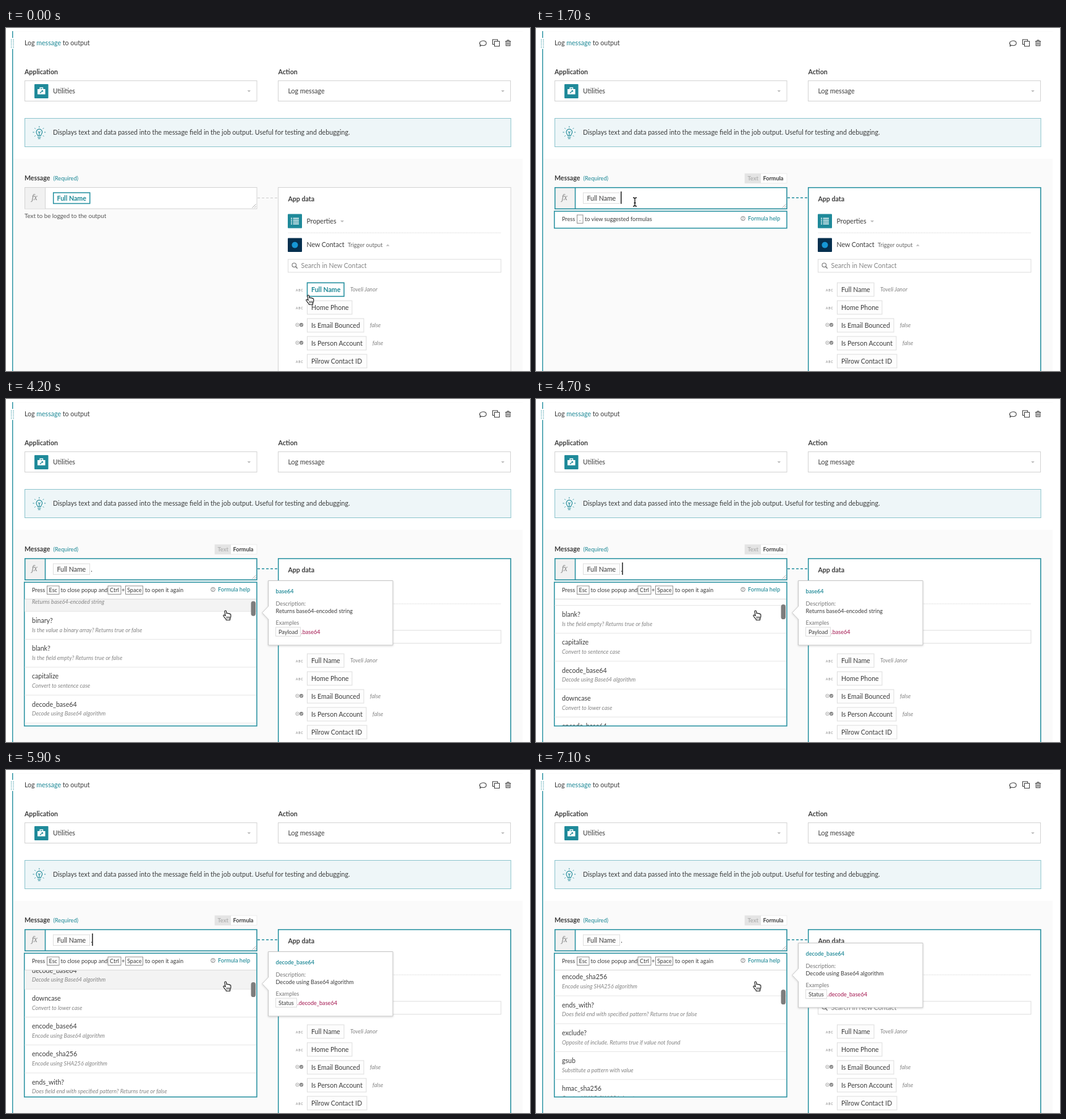
Write an HTML page that moves like this. It is 848x556 px and loops after 7.2 s.

```html
<!DOCTYPE html>
<html lang="en">
<head>
<meta charset="utf-8">
<title>Formula popup</title>
<style>
  html, body { margin: 0; width: 100%; height: 100%; overflow: hidden; background: #fff; }
  svg { display: block; width: 848px; height: 556px; }
  text { font: 10.6px Lato, "Open Sans", sans-serif; fill: #3d3d3d; white-space: pre; }
  .b { font-weight: 700; }
  .s { font-size: 9.1px; }
  .i { font-style: italic; fill: #858585; }
  .teal { fill: #1d8896; }
  .grey { fill: #858585; }
  .abc { font-size: 4.8px; font-weight: 700; letter-spacing: .9px; fill: #999; }
  .box { fill: #fff; stroke: #d3d3d3; }
  .pill { fill: #fdfdfd; stroke: #dedede; }
  .key { fill: #fff; stroke: #777; stroke-width: .8; }
  .ring { fill: none; stroke: #2590a0; stroke-width: 1.5; }
  .line { fill: none; stroke: #e6e6e6; }
  .icon { fill: none; stroke: #444; stroke-width: 1.1; stroke-linejoin: round; }
  .bulb { fill: none; stroke: #1d8896; stroke-width: 1.1; stroke-linecap: round; }
  .caretdown { fill: #bdbdbd; }
  .pointer { fill: #fff; stroke: #111; stroke-width: 1.1; stroke-linejoin: round; }
</style>
</head>
<body>
<svg viewBox="0 0 848 556">
  <defs>
    <clipPath id="listClip"><rect x="30" y="324.5" width="375" height="205"/></clipPath>
    <filter id="shadow" x="-10%" y="-10%" width="120%" height="125%">
      <feDropShadow dx="0" dy="1" stdDeviation="1.5" flood-opacity=".16"/>
    </filter>
  </defs>

  <!-- step card -->
  <rect width="848" height="556" fill="#fff"/>
  <path d="M12 5.5H836" stroke="#fafafa"/>
  <rect x="12" y="212" width="824" height="344" fill="#fafafa"/>
  <path d="M10.7 5V556" stroke="#2590a0" stroke-width="1.4"/>
  <rect x="7" y="16" width="7" height="18" fill="#fff"/>
  <path d="M8.6 18V33M12 18V33" stroke="#5aa9b4" stroke-width="1.3" stroke-dasharray="1.3 1.3"/>
  <text x="30" y="28">Log <tspan class="teal">message</tspan> to output</text>
  <path class="icon" d="M772 20.7c7 0 7 7.8 0 7.8c-.9 0-1.6-.1-2.3-.4l-2.7 1.4l.7-2.5c-2.7-2.4-.6-6.3 4.300-6.300z"/>
  <path class="icon" d="M790.500 21.500H798.500V29.500H790.500ZM790 26.500H787.500V18.800H795.500V21"/>
  <path class="icon" d="M808 21.500H817M811 21V19.700H814V21M809.200 22V28.800H815.800V22M811.400 23V27.500M813.600 23V27.500" stroke-width="1.5"/>

  <text class="b" x="30" y="75">Application</text>
  <text class="b" x="440.500" y="75">Action</text>
  <rect class="box" x="30.500" y="85.500" width="375.500" height="33"/>
  <rect class="box" x="440.500" y="85.500" width="376" height="33"/>
  <path class="caretdown" d="M390.500 101h5.500l-2.750 3zM801.200 101h5.500l-2.750 3z"/>
  <rect x="46" y="91" width="22.500" height="23" rx="1" fill="#1f8a9a"/>
  <path d="M51 99h12.500v8.500H51z" fill="#fff"/>
  <path d="M55 99v-2h4.500v2" fill="none" stroke="#fff" stroke-width="1.3"/>
  <path d="M55 105.500l3.800-3.600M57.500 101.500h2v2" fill="none" stroke="#1f8a9a" stroke-width="1.2"/>
  <text x="76" y="106">Utilities</text>
  <text x="456.500" y="106">Log message</text>

  <rect x="30.500" y="146.500" width="786.500" height="46" fill="#eef6f8" stroke="#8cc4cd"/>
  <g class="bulb">
    <path d="M51.300 174.500c0-2-2.300-2.800-2.300-5.800a4.800 4.800 0 0 1 9.600 0c0 3-2.300 3.800-2.300 5.800zM51.500 177H56M52.300 179.300H55.200M53.800 174v-4.500l-1.500-1.300M53.800 169.500l1.500-1.300"/>
    <path d="M53.800 159.500v1.500M46.500 162.300l1 1M61 162.300l-1 1M43.800 169h1.500M62.300 169h1.500M46.500 175.500l1-1M61 175.500l-1-1" stroke-width=".9"/>
  </g>
  <text x="76" y="173">Displays text and data passed into the message field in the job output. Useful for testing and debugging.</text>

  <!-- message field -->
  <text class="b" x="30" y="247">Message</text>
  <text class="s teal" x="76.500" y="246.700">(Required)</text>
  <rect class="box" x="30.500" y="258.500" width="375.500" height="34.500"/>
  <rect x="31" y="259" width="32.500" height="33.500" fill="#f1f1f1"/>
  <path d="M63.500 259V293" stroke="#d3d3d3"/>
  <text x="41.500" y="279" style="font:italic 12px 'Noto Serif',serif;fill:#8a8a8a;letter-spacing:-.8px">fx</text>
  <path d="M398.500 291.500l6-6M402 291.500l2.500-2.500" stroke="#999" stroke-width=".8"/>
  <text x="30" y="307.500" style="font-size:9.7px;fill:#555">Text to be logged to the output</text>
  <path d="M407 275.500H440" stroke="#ccc" stroke-dasharray="4 3"/>

  <!-- data panel -->
  <rect class="box" x="440.500" y="258.500" width="376.500" height="310"/>
  <text class="b" x="456.500" y="281">App data</text>
  <rect x="456" y="301.500" width="23" height="23" rx="1" fill="#1f8a9a"/>
  <path d="M461 308.500h2M461 311.500h2M461 314.500h2M461 317.500h2M464.500 308.500H474M464.500 311.500H474M464.500 314.500H474M464.500 317.500H474" stroke="#fff" stroke-width="1.5"/>
  <text x="486.500" y="317.300">Properties</text>
  <path class="caretdown" d="M541 312h6l-3 3zM614.800 353.500h6l-3-3z"/>
  <path d="M456.500 332H801" stroke="#e2e2e2" stroke-dasharray="2 .6"/>
  <rect x="456" y="340.500" width="23" height="22.500" rx="1" fill="#06304f"/>
  <circle cx="467.500" cy="351.800" r="5" fill="#1697d6"/>
  <text x="486.500" y="355.300">New Contact</text>
  <text class="s" x="553" y="355" style="fill:#666">Trigger output</text>
  <rect class="box" x="456.500" y="375" width="344.500" height="21" style="stroke:#ddd"/>
  <circle cx="466.300" cy="384.300" r="3.300" class="icon" style="stroke:#777"/>
  <path d="M468.800 386.800l2.800 2.900" stroke="#777" stroke-width="1.500"/>
  <text class="grey" x="477.500" y="389.300">Search in New Contact</text>
  <g id="fields"></g>

  <g id="grab">
    <rect x="487.500" y="413" width="59.500" height="22" fill="#fff" class="ring" style="fill:#fff"/>
    <text class="b teal" x="494" y="427.500">Full Name</text>
    <rect x="76.700" y="267" width="59" height="17.500" class="ring" style="fill:#fff"/>
    <text class="b teal" x="82.500" y="279.700">Full Name</text>
  </g>
  <g id="plain">
    <rect class="pill" x="76.500" y="267" width="59" height="17.500"/>
    <text x="82.500" y="279.700">Full Name</text>
  </g>
  <text id="dot" x="137.300" y="279.700">.</text>

  <!-- focused look -->
  <g id="focus">
    <rect class="ring" x="30.700" y="258.700" width="375.200" height="34.500"/>
    <path class="ring" d="M63.500 259V293"/>
    <rect class="ring" x="440.700" y="258.700" width="376" height="310"/>
    <path class="ring" d="M407 275.300H440" stroke-dasharray="4 3"/>
    <rect x="338" y="236" width="68" height="15.500" fill="#fff" stroke="#e9e9e9" stroke-width=".8"/>
    <rect x="338" y="236" width="26" height="15.500" fill="#e4e4e4"/>
    <text class="s b" x="342.500" y="247" style="fill:#b3b3b3">Text</text>
    <text class="s b" x="367.500" y="247">Formula</text>
  </g>
  <rect id="caret" y="265" width="1.500" height="20" fill="#222"/>

  <!-- suggestion popup -->
  <g id="popup">
    <rect id="frame" class="ring" x="29.700" y="297" width="376.200" style="fill:#fff"/>
    <text class="s" x="42" y="312.500">Press</text>
    <g id="hint">
      <rect class="key" x="66.500" y="303" width="9.500" height="13.500"/>
      <text class="s" x="70" y="312.500">.</text>
      <text class="s" x="79" y="312.500">to view suggested formulas</text>
    </g>
    <g id="keys">
      <rect class="key" x="66.500" y="303" width="19.500" height="13.500"/>
      <rect class="key" x="165" y="303" width="21" height="13.500"/>
      <rect class="key" x="193.500" y="303" width="28" height="13.500"/>
      <text class="s" x="69.500" y="312.500">Esc</text>
      <text class="s" x="88.500" y="312.500">to close popup and</text>
      <text class="s" x="168" y="312.500">Ctrl</text>
      <text class="s" x="187" y="312.500">+</text>
      <text class="s" x="196" y="312.500">Space</text>
      <text class="s" x="225" y="312.500">to open it again</text>
    </g>
    <circle cx="335" cy="308.700" r="3.300" fill="none" stroke="#777" stroke-width=".9"/>
    <text x="333.500" y="310.900" style="font-size:6px;font-weight:700;fill:#777">?</text>
    <text class="s teal" x="343" y="312" style="font-weight:500">Formula help</text>
    <g id="list" clip-path="url(#listClip)">
      <g id="rows"></g>
      <rect id="thumb" x="396.500" width="7.500" height="24" rx="3.700" fill="#7d7d7d"/>
    </g>
    <path id="rule" class="line" d="M30.500 324.300H405" style="stroke:#d8d8d8"/>
  </g>

  <g id="tip">
    <path d="M424.500 294.500H626V399H424.500V357L414.500 346.500L424.500 336Z" fill="#fff" stroke="#c6c6c6" filter="url(#shadow)"/>
    <text id="tipName" class="s teal" x="436.500" y="314.500" style="font-weight:600"></text>
    <text class="s" x="436.500" y="334.500" style="fill:#777">Description:</text>
    <text id="tipAbout" class="s" x="436.500" y="346.700"></text>
    <text class="s" x="436.500" y="365.700" style="fill:#777">Examples</text>
    <rect id="tipPill" class="pill" x="436.500" y="370" width="40" height="14.500"/>
    <text id="tipArg" class="s" x="441" y="380.700"></text>
    <text id="tipCall" class="s" y="380.700" style="fill:#a3164f"></text>
  </g>

  <g id="cursor">
    <g id="hand">
      <path class="pointer" d="M-4.200-6.500c0-2 2.600-2 2.800 0l.4 3.200c.6-1 2.300-.8 2.500.3c.6-.8 2.100-.5 2.300.6c.8-.6 2-.1 2 1.100v2.700c0 2-1.300 2.600-1.300 4.600v1.200h-6.300v-1c-1-1.600-3.800-4-4.400-5.600c-.4-1.200 1-2 2-1.200l1.300 1.200z"/>
      <path d="M-.5 1.500v3.300M1.600 1.500v3.300M3.600 1.500v3.300" stroke="#111" stroke-width=".9"/>
    </g>
    <path id="arrow" d="M-3-8v13l3-2.800l1.900 4.400l2-.9l-1.900-4.300h4z" fill="#111" stroke="#fff" stroke-width="1"/>
    <path id="beam" d="M-3-6.500q2.500 0 3 1.500q.5-1.500 3-1.500M0-5.500V6.500M-3 7.500q2.500 0 3-1.500q.5 1.500 3 1.500M-1.500 2h3" fill="none" stroke="#111" stroke-width="1.300"/>
  </g>
</svg>

<script>
const LOOP = 7200, STEP = 100, PITCH = 45.25, BLINK = 533.3;
const $ = id => document.getElementById(id);

const fields = [
  ["Full Name", 59.5, "Toveli Janor"],
  ["Home Phone", 72.5],
  ["Is Email Bounced", 91.5, "false"],
  ["Is Person Account", 95.5, "false"],
  ["Pilrow Contact ID", 96.5]
];

const formulas = [
  ["base64", "Returns base64-encoded string"],
  ["binary?", "Is the value a binary array? Returns true or false"],
  ["blank?", "Is the field empty? Returns true or false"],
  ["capitalize", "Convert to sentence case"],
  ["decode_base64", "Decode using Base64 algorithm"],
  ["downcase", "Convert to lower case"],
  ["encode_base64", "Encode using Base64 algorithm"],
  ["encode_sha256", "Encode using SHA256 algorithm"],
  ["ends_with?", "Does field end with specified pattern? Returns true or false"],
  ["exclude?", "Opposite of include. Returns true if value not found"],
  ["gsub", "Substitute a pattern with value"],
  ["hmac_sha256", "Creates HMAC_SHA256 signature"]
];

const toggleIcon = y => `
  <circle cx="471.500" cy="${y}" r="2.700" fill="none" stroke="#999" stroke-width=".8"/>
  <path d="M470.500 ${y - 1}l2 2m0-2l-2 2" stroke="#999" stroke-width=".7"/>
  <circle cx="478" cy="${y}" r="3.100" fill="#888"/>
  <path d="M476.500 ${y}l1.200 1.200l2-2.200" fill="none" stroke="#fff" stroke-width=".9"/>`;

$("fields").innerHTML = fields.map(([name, w, sample], n) => {
  const y = 424 + n * 29;
  const mark = sample === "false" ? toggleIcon(y - .8) : `<text class="abc" x="469" y="${y + 2.7}">ABC</text>`;
  const note = sample ? `<text class="s i" x="${487.5 + w + 10}" y="${y + 3.2}">${sample}</text>` : "";
  return `${mark}<rect class="pill" x="487.500" y="${y - 11}" width="${w}" height="22"/>
    <text x="494" y="${y + 3.5}">${name}</text>${note}`;
}).join("");

$("rows").innerHTML = `<rect id="mark" x="30" width="375" height="${PITCH}" fill="#f3f3f3"/>` +
  formulas.map(([name, about], n) => {
    const y = 324 + n * PITCH;
    return `<text x="42" y="${y + 18.5}">${name}</text>
      <text class="s i" x="42" y="${y + 33.3}">${about}</text>
      <path class="line" d="M30 ${y + PITCH}H405"/>`;
  }).join("");

// [time, value, ...] points
const scrollPath = [[3900, 0], [4100, 14], [4700, 80], [5400, 172], [5700, 195], [5900, 195], [6600, 256], [7100, 320]];
const pointerPath = [[0, 492, 441], [1500, 160, 281.5], [2300, 160, 281.5], [3100, 320, 345], [3200, 320, 345], [3600, 358, 351]];

function along(path, t, ease = k => k) {
  const n = path.findIndex(p => p[0] > t);
  if (n === 0) return path[0].slice(1);
  if (n < 0) return path[path.length - 1].slice(1);
  const a = path[n - 1], b = path[n], k = ease((t - a[0]) / (b[0] - a[0]));
  return a.slice(1).map((v, i) => v + (b[i + 1] - v) * k);
}
const smooth = k => k * k * (3 - 2 * k);
const show = (id, on) => { $(id).style.display = on ? "" : "none"; };

function caretOn(t) {
  if (t < 1600) return false;
  const since = t < 2200 ? t - 1600 : t - 2200;
  return Math.floor(since / BLINK) % 2 === 0;
}

function drawTip(t) {
  const late = t >= 5900;
  const [name, about] = formulas[late ? 4 : 0];
  show("tip", t >= 2400);
  $("tip").setAttribute("transform", `translate(0 ${t >= 6000 ? -14 : 0})`);
  $("tipName").textContent = name;
  $("tipAbout").textContent = about;
  $("tipArg").textContent = late ? "Status" : "Payload";
  $("tipPill").setAttribute("width", late ? 34 : 40);
  $("tipCall").setAttribute("x", late ? 471.5 : 477.5);
  $("tipCall").textContent = "." + name;
  $("mark").setAttribute("y", 324 + (late ? 4 : 0) * PITCH);
}

function drawPointer(t) {
  const [x, y] = along(pointerPath, t, smooth);
  const inField = x > 64 && x < 406 && y > 258 && y < 296;
  const clickable = t < 200 || (t > 2300 && y > 331);
  $("cursor").setAttribute("transform", `translate(${x} ${y})`);
  show("beam", inField);
  show("hand", !inField && clickable);
  show("arrow", !inField && !clickable);
}

function draw(t) {
  const open = t >= 2300;
  show("grab", t < 200);
  show("plain", t >= 200);
  $("focus").style.opacity = Math.min(1, Math.max(0, (t - 1500) / 200));
  show("dot", t >= 2200);
  show("caret", caretOn(t));
  $("caret").setAttribute("x", t < 2200 ? 137 : 139.2);

  show("popup", t >= 1700);
  $("frame").setAttribute("height", open ? 233 : 27.5);
  show("hint", !open);
  for (const id of ["keys", "list", "rule"]) show(id, open);

  const [scroll] = along(scrollPath, t);
  $("rows").setAttribute("transform", `translate(0 ${-scroll})`);
  $("thumb").setAttribute("y", 325.4 + scroll * .096);
  show("thumb", t >= 4000);

  drawTip(t);
  drawPointer(t);
}

const start = performance.now();
function tick() {
  const t = (performance.now() - start) % LOOP;
  draw(Math.floor(t / STEP) * STEP);
  requestAnimationFrame(tick);
}
tick();
</script>
</body>
</html>
```
